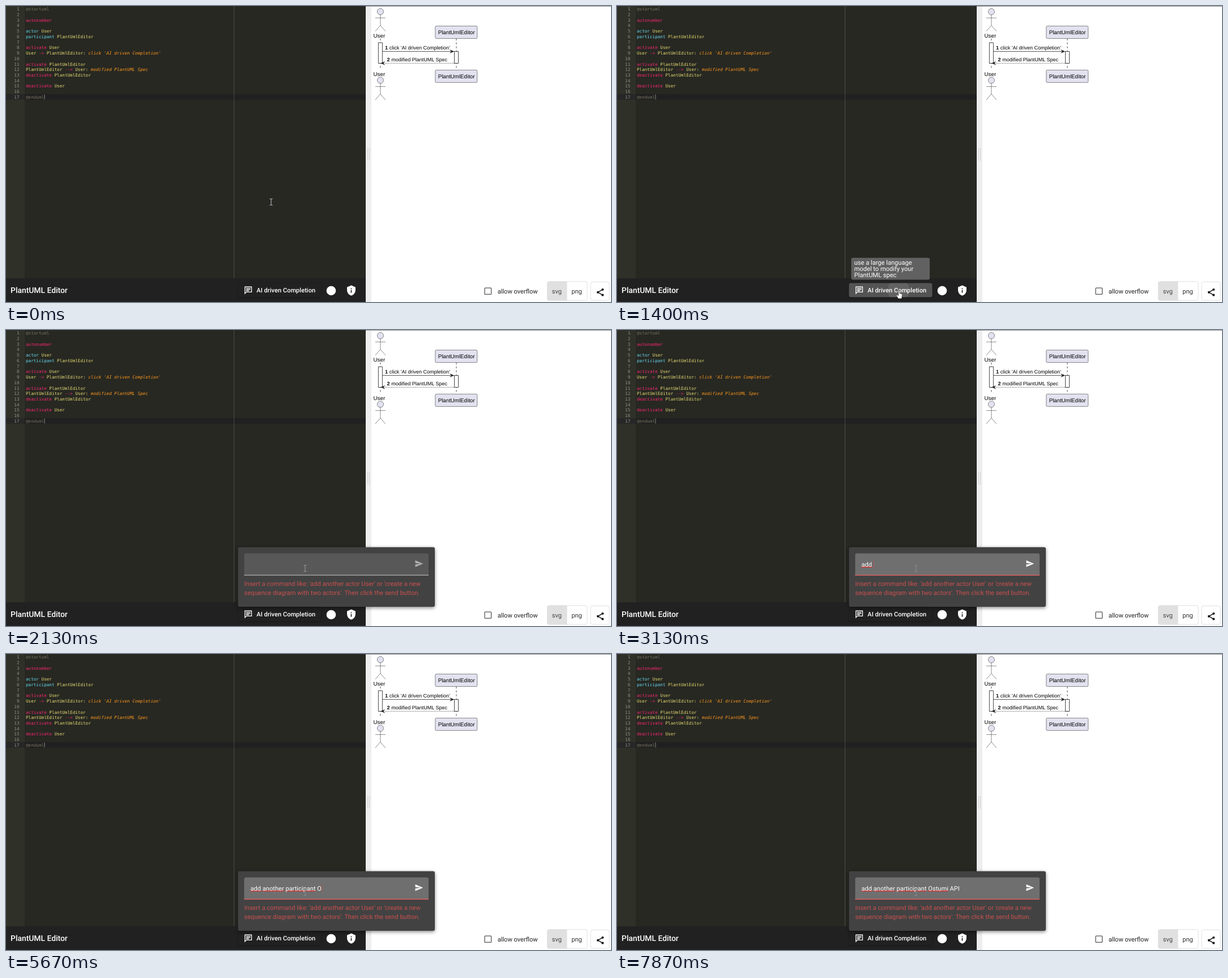
Write an HTML page that moves like this. It is 1068 by 524 pixels and loops after 8000 ms.

```html
<!DOCTYPE html>
<html lang="en">
<head>
<meta charset="utf-8">
<title>PlantUML Editor</title>
<style>
html, body { margin: 0; width: 100%; height: 100%; overflow: hidden; background: #fff; }
svg { display: block; width: 1068px; height: 524px; }
text { font: 11.1px Roboto, sans-serif; text-rendering: geometricPrecision; white-space: pre; }
.light { fill: #fff; }
.medium { font-weight: 500; }
#code text { font: 7.63px "DejaVu Sans Mono", monospace; fill: #e6db74; }
#code .num { fill: #8f908a; text-anchor: end; }
#code .meta { fill: #75715e; }
#code .key { fill: #f92672; }
#code .type { fill: #66d9ef; }
#code .msg { fill: #fd971f; font-style: italic; }
#diagram { stroke: #181818; stroke-width: .5; fill: #e2e2f0; }
#diagram text { font: 9.72px "Liberation Sans", Arial, sans-serif; fill: #000; stroke: none; }
#diagram .small { font-size: 9.02px; }
#diagram .line { fill: none; stroke-width: .75; }
#diagram .bar { fill: #fff; stroke-width: .8; }
#diagram .tip { fill: #181818; }
#hint text { fill: #c9504f; }
#panel { filter: drop-shadow(0 2px 3px #0007); }
#ibeam { mix-blend-mode: difference; }
</style>
</head>
<body>
<svg viewBox="0 0 1068 524">
  <defs>
    <g id="actor">
      <circle r="5.55"/>
      <path fill="none" d="M0 5.55V24.3M-9 11.1H9M-9 34.7L0 24.3 9 34.7"/>
    </g>
    <clipPath id="buttonShape"><rect x="409.5" y="490.5" width="147" height="25" rx="3"/></clipPath>
  </defs>

  <rect width="635" height="482" fill="#272822"/>
  <rect width="33" height="482" fill="#2f3129"/>
  <rect y="156" width="635" height="10" fill="#202020"/>
  <rect y="156" width="33" height="10" fill="#272727"/>
  <path d="M402.5 0V482" stroke="#555651" stroke-width=".8"/>
  <g id="code"></g>
  <path d="M68 156.5V165.5" stroke="#a0a09a" stroke-width=".8"/>

  <rect x="635" width="10" height="524" fill="#eee"/>
  <path d="M638.5 252V273M641.5 252V273" stroke="#aaa" stroke-dasharray="1 1.5"/>
  <path d="M635 .5H1068" stroke="#8c8c8c"/>

  <g id="diagram">
    <path class="line" stroke-dasharray="3.47" d="M660.9 57.5V113M795 57.5V113"/>
    <use href="#actor" x="660.9" y="10"/>
    <use href="#actor" x="660.9" y="131.5"/>
    <text x="648.6" y="55.5">User</text>
    <text x="648.6" y="123.5">User</text>
    <rect x="757.8" y="35.5" width="74" height="22" rx="1.7"/>
    <rect x="757.8" y="113.4" width="74" height="22" rx="1.7"/>
    <text x="762.7" y="50.2">PlantUmlEditor</text>
    <text x="762.7" y="128.4">PlantUmlEditor</text>
    <rect class="bar" x="657.3" y="65" width="7" height="36.4"/>
    <rect class="bar" x="791.5" y="80.4" width="7" height="21"/>
    <path class="line" d="M664.5 80.4H788"/>
    <path class="line" stroke-dasharray="1.4" d="M666 101.3H791.5"/>
    <path class="tip" d="M783.7 77.6L790.6 80.4 783.7 83.2 786.5 80.4zM668.6 98.5L661.7 101.3 668.6 104.1 665.8 101.3z"/>
    <text class="small" x="669" y="77.3"><tspan font-weight="bold">1</tspan></text>
    <text class="small" x="676.7" y="77.3">click 'AI driven Completion'</text>
    <text class="small" x="672.5" y="98"><tspan font-weight="bold">2</tspan></text>
    <text class="small" x="680.2" y="98">modified PlantUML Spec</text>
  </g>

  <rect x="845" y="499.2" width="11.6" height="11.2" rx="1" fill="none" stroke="#555" stroke-width="1.3"/>
  <text x="867.7" y="508.5" fill="#212121">allow overflow</text>
  <rect x="955.5" y="487.8" width="70.5" height="33.4" rx="3" fill="#fff" stroke="#e0e0e0"/>
  <path d="M990.5 487.5H958.5a3 3 0 0 0-3 3v28a3 3 0 0 0 3 3h32z" fill="#e0e0e0"/>
  <text x="963.8" y="508.5" fill="#444">svg</text>
  <text x="998.2" y="508.5" fill="#333">png</text>
  <rect x="1032" y="488.3" width="33" height="32.7" rx="3" fill="#fff" stroke="#e0e0e0"/>
  <g transform="translate(1040.7 498.5) scale(.694)" fill="#111">
    <path d="M18 5L6 12 18 19" fill="none" stroke="#111" stroke-width="2"/>
    <circle cx="18" cy="5" r="3"/><circle cx="6" cy="12" r="3"/><circle cx="18" cy="19" r="3"/>
  </g>

  <rect y="482" width="635" height="42" fill="#212121"/>
  <text class="light medium" x="8" y="508" style="font-size:13.88px">PlantUML Editor</text>
  <rect id="button" x="409.5" y="490.5" width="147" height="25" rx="3" style="filter:drop-shadow(0 1px 1px #0004)"/>
  <circle id="ripple" cx="497" cy="503" fill="#fff" clip-path="url(#buttonShape)"/>
  <g transform="translate(419.8 495.3) scale(.65)" fill="none" stroke="#fff" stroke-width="2">
    <path d="M3 21V3H21V17H7zM6 7H18M6 10.2H18M6 13.4H14"/>
  </g>
  <text class="light medium" x="442.3" y="507">AI driven Completion</text>
  <circle cx="574" cy="504" r="8.3" fill="#fff"/>
  <g transform="translate(599.5 493.7) scale(.83)">
    <path fill="#fff" d="M12 1L3 5v6c0 5.55 3.84 10.74 9 12 5.16-1.26 9-6.45 9-12V5z"/>
    <path stroke="#212121" stroke-width="2" d="M12 7V9M12 11V17"/>
  </g>

  <g id="tooltip">
    <rect x="413.5" y="445.7" width="138.5" height="38.8" rx="3" fill="#616161"/>
    <text class="light" x="418.7" y="457.8">use a large language</text>
    <text class="light" x="418.7" y="469">model to modify your</text>
    <text class="light" x="418.7" y="480.2">PlantUML spec</text>
  </g>

  <g id="panel">
    <rect x="409.5" y="384.6" width="347.5" height="105.4" rx="3" fill="#424242"/>
    <path id="field" d="M420.5 434.5V398.5a3 3 0 0 1 3-3H743a3 3 0 0 1 3 3v36z"/>
    <path id="rule" d="M420.5 434H746"/>
    <path id="focusRule" stroke="#c94c4c" stroke-width="1.3"/>
    <path id="send" transform="translate(721.2 405.9) scale(.65)" d="M2 21L23 12 2 3V10L17 12 2 14z"/>
    <g id="hint">
      <text x="420.5" y="452.5">Insert a command like: 'add another actor User' or 'create a new</text>
      <text x="420.5" y="469">sequence diagram with two actors'. Then click the send button.</text>
    </g>
    <path id="marks" stroke="#e03030" stroke-width="1.5"/>
    <text id="input" class="light" x="431.5" y="418.7"></text>
    <path id="caret" stroke="#c9504f" stroke-width=".8"/>
  </g>

  <path id="ibeam" fill="none" stroke="#fff" stroke-width=".9" d="M-2.6-5.6H-1L0-4.8 1-5.6H2.6M0-4.8V4.8M-2.6 5.6H-1L0 4.8 1 5.6H2.6"/>
  <path id="hand" fill="#fff" stroke="#222" stroke-width=".6" d="M-1.2.8C-1.2-.5 1-.5 1 .8V5.6L4.2 6.6Q5.6 7 5.4 8.8L4.5 15H-1.5L-4.6 9.8Q-5 8.2-3.6 8.2L-1.2 9.8z"/>
</svg>
<script>
const $ = id => document.getElementById(id);
const set = (id, attrs) => { for (const k in attrs) $(id).setAttribute(k, attrs[k]); };
const ramp = (t, a, b) => Math.min(1, Math.max(0, (t - a) / (b - a)));
const smooth = p => p * p * (3 - 2 * p);
const out = p => 1 - (1 - p) ** 3;
const mix = (a, b, p) => a + (b - a) * p;
const gray = v => `rgb(${v},${v},${v})`;

const source = `@startuml

autonumber

actor User
participant PlantUmlEditor

activate User
User -> PlantUmlEditor: click 'AI driven Completion'

activate PlantUmlEditor
PlantUmlEditor --> User: modified PlantUML Spec
deactivate PlantUmlEditor

deactivate User

@enduml`;
const rules = /(?<meta>@\w+)|(?<key>^(?:autonumber|(?:de)?activate)|-+>)|(?<type>^(?:actor|participant))|(?<msg>(?<=: ).+)/g;
const paint = line => line.replace(rules, (...m) => {
  const kinds = m.at(-1);
  return `<tspan class="${Object.keys(kinds).find(k => kinds[k])}">${m[0]}</tspan>`;
});
$('code').innerHTML = source.split('\n').map((line, i) => {
  const y = 8.3 + 9.72 * i;
  return `<text class="num" x="23.5" y="${y}">${i + 1}</text><text x="35" y="${y}">${paint(line)}</text>`;
}).join('');

// Bursts of typing: text, first key time, last key time
const bursts = [
  ['add ', 2870, 3130], ['another', 3270, 3870], [' ', 4070, 4070],
  ['parti', 4270, 4600], ['cipa', 4800, 5130], ['nt', 5270, 5330], [' ', 5470, 5470],
  ['Ost', 5670, 5930], ['umi', 6070, 6270], [' ', 6930, 6930],
  ['A', 7130, 7130], ['PI', 7270, 7330]
];
const keys = bursts.flatMap(([s, a, b]) =>
  [...s].map((c, i) => [c, s.length > 1 ? mix(a, b, i / (s.length - 1)) : a]));
// Spelling marks: first character, last character, time
const spelling = [[0, 2, 3130], [4, 10, 4130], [12, 22, 5470], [24, 29, 7000]];
const input = $('input'), left = 431.5;

function drawInput(t) {
  const typed = keys.filter(k => k[1] <= t + 1);
  const text = typed.map(k => k[0]).join('');
  if (input.textContent !== text) input.textContent = text;
  set('marks', { d: spelling.filter(m => m[2] <= t + 1).map(([a, b]) =>
    `M${input.getStartPositionOfChar(a).x} 419.6H${input.getEndPositionOfChar(b).x}`).join('') });
  const last = typed.length ? typed.at(-1)[1] : 2400;
  const x = text ? input.getEndPositionOfChar(text.length - 1).x : left;
  const on = t >= 2400 && (t - last) % 1080 < 540;
  set('caret', { d: `M${x + .4} 408.5V421.5`, opacity: +on });
}

function draw(t) {
  const go = smooth(ramp(t, 20, 330)), leave = smooth(ramp(t, 1650, 2130));
  const x = mix(mix(468, 498, go), 528, leave);
  const y = mix(mix(347, 503, go), 422, leave);
  const onButton = y > 490;
  set('ibeam', { transform: `translate(${x} ${y})`, opacity: +!onButton });
  set('hand', { transform: `translate(${x} ${y})`, opacity: +onButton });

  const hover = ramp(t, 230, 400) * (1 - ramp(t, 1740, 1930));
  set('button', { fill: gray(mix(33, 84, hover)) });
  const press = ramp(t, 1400, 1600);
  set('ripple', { r: mix(19, 95, press), opacity: t < 1395 ? 0 : .09 * (1 - press) });
  set('tooltip', { opacity: ramp(t, 320, 460) * (1 - ramp(t, 1440, 1540)) });

  const open = out(ramp(t, 1450, 1625));
  const s = mix(.8, 1, open);
  set('panel', { opacity: open, transform: `translate(409.5 490) scale(${s}) translate(-409.5 -490)` });
  const over = ramp(t, 1850, 2100), focus = ramp(t, 2370, 2670);
  set('field', { fill: gray(mix(mix(74, 88, over), 111, focus)) });
  set('rule', { stroke: gray(mix(140, 200, over)) });
  const half = 162.75 * mix(.5, 1, out(focus));
  set('focusRule', { d: `M${583.25 - half} 434H${583.25 + half}`, opacity: focus });
  set('send', { fill: gray(mix(mix(160, 178, over), 250, focus)) });
  drawInput(t);
}

const start = performance.now();
function tick() {
  draw((performance.now() - start) % 8000);
  requestAnimationFrame(tick);
}
tick();
</script>
</body>
</html>
```
